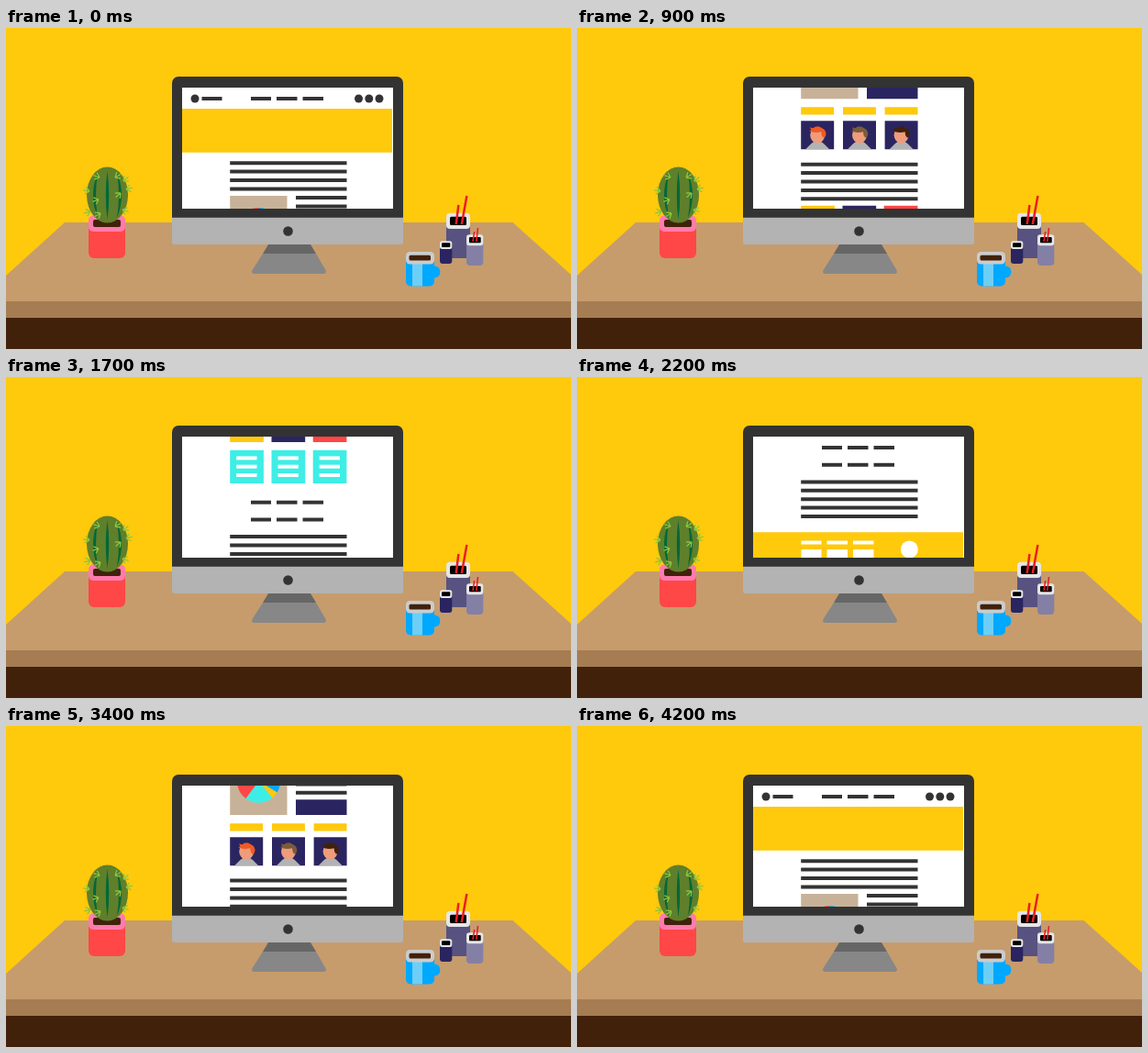
Write an HTML page with a canvas that moves like this. It is 616 by 350 pixels and loops after 4.3 s.

```html
<!DOCTYPE html>
<html lang="en">
<head>
<meta charset="utf-8">
<title>Desk with scrolling page</title>
<style>
  html, body { margin: 0; width: 616px; height: 350px; overflow: hidden; background: #ffc90c; }
  canvas { display: block; }
</style>
</head>
<body>
<canvas id="stage" width="616" height="350"></canvas>
<script>
const ctx = document.getElementById('stage').getContext('2d');
const LOOP = 4300, STEP = 100, HALF = 21, SCROLL_STEP = 19.9;
const YELLOW = '#ffc90c', DARK = '#333333', NAVY = '#2a2560', RED = '#ff4747',
      BLUE = '#00a8ff', CYAN = '#3eeee6', BROWN = '#42210b', WHITE = '#ffffff', RIM = '#e6e6e6';
const COLUMNS = [244.2, 289.5, 334.7];
const LINKS = [[267, 289], [295, 317.5], [323.5, 346]];

// Corner-to-corner box, optionally rounded.
function box(color, x1, y1, x2, y2, radius = 0) {
  ctx.fillStyle = color;
  ctx.beginPath();
  ctx.roundRect(x1, y1, x2 - x1, y2 - y1, radius);
  ctx.fill();
}

function oval(color, x, y, rx, ry = rx) {
  ctx.fillStyle = color;
  ctx.beginPath();
  ctx.ellipse(x, y, rx, ry, 0, 0, Math.PI * 2);
  ctx.fill();
}

function shape(color, path) {
  ctx.fillStyle = color;
  ctx.fill(new Path2D(path));
}

function stroke(color, width, path) {
  ctx.strokeStyle = color;
  ctx.lineWidth = width;
  ctx.stroke(new Path2D(path));
}

function bar(x1, x2, y, color = DARK) {
  box(color, x1, y - 2, x2, y + 2);
}

function textLines(x, y, count) {
  for (let i = 0; i < count; i++) bar(x, 371.5, y + i * 9.4);
}

function slice(color, from, to) {
  const rad = Math.PI / 180;
  ctx.fillStyle = color;
  ctx.beginPath();
  ctx.moveTo(275.5, 219.5);
  ctx.arc(275.5, 219.5, 23.5, from * rad, to * rad);
  ctx.fill();
}

function portrait(x, hair) {
  ctx.save();
  ctx.translate(x, 280.4);
  box(NAVY, 0, 0, 36, 31);
  shape('#b3b3b3', 'M5 31 Q11 24 18 20 Q25 24 31 31Z');
  oval('#ee9c7b', 18, 15.5, 8, 8.8);
  shape(hair, 'M9 11 L11 10 L10 7 L13 8 Q18 4 23 8 Q28 10 27 16 Q26 19 24 18 Q22 16 22 12 Q15 14 9 11Z');
  ctx.restore();
}

function drawPage() {
  oval(DARK, 206, 77, 4.5);
  bar(213.5, 235.5, 77);
  LINKS.forEach(([a, b]) => bar(a, b, 77));
  [384.5, 395.8, 407].forEach(x => oval(DARK, x, 77, 4.5));
  box(YELLOW, 192, 88, 421, 135.7);

  textLines(244.2, 147.2, 4);
  box('#c7b299', 244.2, 183, 306.5, 256.3);
  slice(BLUE, -90, 31);
  slice(YELLOW, 31, 51);
  slice(CYAN, 51, 127);
  slice(RED, 127, 270);
  textLines(316, 185, 6);
  box(NAVY, 316, 239.5, 371.5, 256.3);

  const hair = ['#f15a24', '#7a5c3a', BROWN];
  [244.2, 290, 335.6].forEach((x, i) => {
    box(YELLOW, x, 265.4, x + 35.9, 273.7);
    portrait(x, hair[i]);
  });
  textLines(244.2, 327.8, 5);

  COLUMNS.forEach((x, i) => {
    box([YELLOW, NAVY, RED][i], x, 372.8, x + 36.7, 409.2);
    box(CYAN, x, 418, x + 36.7, 454.2);
    for (let y = 426.7; y < 446; y += 9.3) bar(x + 7, x + 29.3, y, WHITE);
  });

  LINKS.forEach(([a, b]) => {
    bar(a, b, 475);
    bar(a, b, 493.8);
  });
  textLines(244.2, 512.4, 5);

  box(YELLOW, 192, 567.2, 421, 616);
  LINKS.forEach(([a, b]) => {
    bar(a - 22.5, b - 22.5, 578.5, WHITE);
    box(WHITE, a - 22.5, 586, b - 22.5, 605);
  });
  oval(WHITE, 362.4, 586, 9.5);
}

function drawDesk() {
  box(YELLOW, 0, 0, 616, 350);
  shape('#c69c6d', 'M64 212 H552.5 L616 269 V298 H0 V270Z');
  box('#a67c52', 0, 298, 616, 316);
  box(BROWN, 0, 316, 616, 350);
}

function drawComputer(scroll) {
  shape('#666666', 'M286 236 H332 L338 246 H280Z');
  shape('#878787', 'M280 246 H338 L348.5 264 Q350 268 346 268 H271 Q267 268 268.5 264Z');
  box(DARK, 181, 53, 433, 207, [7, 7, 0, 0]);
  box('#b3b3b3', 181, 206.7, 433, 236, [0, 0, 2, 2]);
  oval(DARK, 307.5, 221.5, 5.3);
  box(WHITE, 192, 65, 422, 197);
  ctx.save();
  ctx.beginPath();
  ctx.rect(192, 65, 230, 132);
  ctx.clip();
  ctx.translate(0, -scroll);
  drawPage();
  ctx.restore();
}

function spine(x, y, degrees) {
  ctx.save();
  ctx.translate(x, y);
  ctx.rotate(degrees * Math.PI / 180);
  stroke('#8cc63f', 1.3, 'M0 0 L7 0 M0 0 L4.5 -4 M0 0 L4.5 4');
  ctx.restore();
}

function drawCactus() {
  box(RED, 90, 208, 130, 251, 6);
  box('#ff7bac', 90, 204.5, 130, 222, 5);
  box(BROWN, 95, 209, 125, 217, 2);
  oval('#5f7f2b', 110.5, 182, 22.5, 30.5);
  shape('#006837', 'M100 158 Q90 182 100 207 Q96 182 100 158Z');
  shape('#006837', 'M110.5 156 Q107 182 110.5 209 Q114 182 110.5 156Z');
  shape('#006837', 'M121 158 Q131 182 121 207 Q125 182 121 158Z');
  [[102, 163, 200], [125, 180, 140], [101, 187, 160], [91, 178, 190],
   [131, 176, -15], [128, 167, -40], [92, 200, 165], [103, 202, 150],
   [127, 198, 20], [119, 163, -30]].forEach(s => spine(...s));
}

function drawMug() {
  box(BLUE, 458, 259.5, 473.3, 272.5, 6);
  box(BLUE, 436, 246, 467, 281.5, 5);
  box('#6dcff6', 443, 255, 454, 281.5);
  box('#cccccc', 436, 244, 467, 257.5, 4.5);
  box(BROWN, 439.5, 247.8, 463, 253.5, 1.5);
}

function drawCups() {
  box('#57527f', 480, 204, 506, 251, 5);
  box(RIM, 480, 201.7, 506, 219, 4);
  box('#000000', 484, 205.7, 502, 215, 1.5);
  stroke('#ed1c24', 2.5, 'M490.7 214 L493.4 193 M496.8 214 L502.4 183');

  box(NAVY, 473, 234, 486.3, 257, 3);
  box(RIM, 473, 232.3, 486.3, 241, 2.5);
  box('#000000', 475, 234.3, 484.3, 239, 1);

  box('#8480a5', 502, 227, 520.3, 259, 4);
  box(RIM, 502, 225.3, 520.3, 237.3, 3);
  box('#000000', 505, 228, 517.7, 234.3, 1);
  stroke('#ed1c24', 1.6, 'M509 233 L510.7 222 M512.8 233 L514.5 218');
}

function render(now) {
  const step = Math.floor((now % LOOP) / STEP);
  const scroll = (HALF - Math.abs(HALF - step)) * SCROLL_STEP;
  drawDesk();
  drawComputer(scroll);
  drawCactus();
  drawCups();
  drawMug();
}

const start = performance.now();
function tick() {
  render(performance.now() - start);
  requestAnimationFrame(tick);
}
tick();
</script>
</body>
</html>
```
